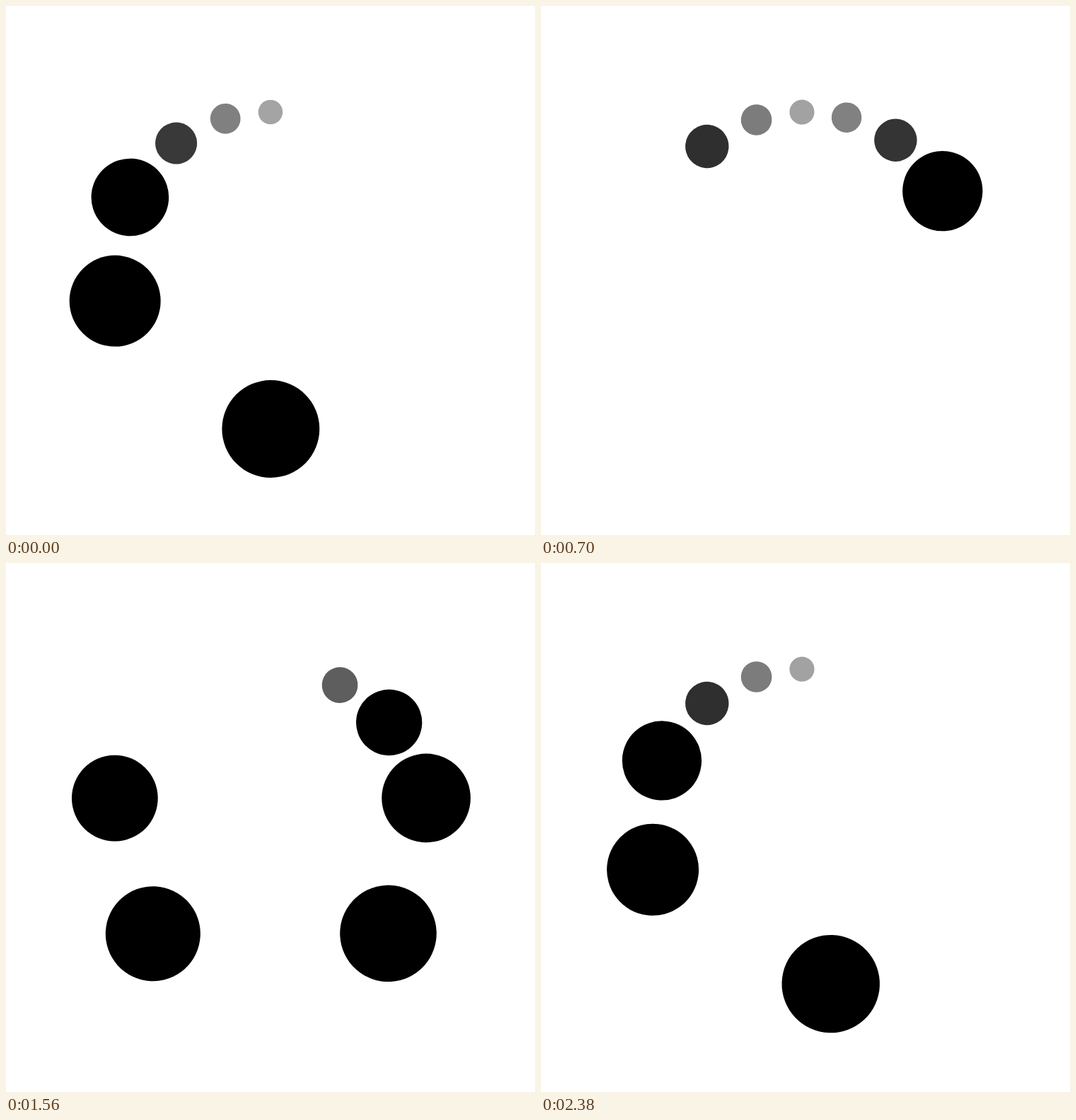
Animation, 748 px wide and 748 px high, one loop 2.4 s. Source, as an HTML page:

```html
<!DOCTYPE html>
<html lang="en">
<head>
<meta charset="utf-8">
<title>Orbit loader</title>
<style>
  @property --turn { syntax: "<angle>"; inherits: false; initial-value: 0deg; }
  @property --grow { syntax: "<number>"; inherits: false; initial-value: 0; }

  html, body { margin: 0; width: 100%; height: 100%; overflow: hidden; background: #fff; }
  svg { display: block; width: 100%; height: 100%; }

  circle {
    --shade: calc(164 - 455 * var(--grow));
    r: calc(17.3px + 52.2px * var(--grow));
    fill: rgb(var(--shade), var(--shade), var(--shade));
    transform: rotate(var(--turn)) translateY(-224px);
    animation:
      orbit 2400ms cubic-bezier(.78, .33, .22, .67) infinite,
      swell 2400ms cubic-bezier(.8, .25, .2, .75) infinite;
    animation-delay: calc(240ms * var(--i) - 2398.8ms);
  }

  @keyframes orbit {
    from { --turn: 0deg; }
    to { --turn: 360deg; }
  }

  /* the peak comes just before the lowest point */
  @keyframes swell {
    0%, 100% { --grow: 0; }
    48.333% { --grow: 1; }
  }
</style>
</head>
<body>
<svg viewBox="-374 -374 748 748">
  <circle style="--i: 0"/>
  <circle style="--i: 1"/>
  <circle style="--i: 2"/>
  <circle style="--i: 3"/>
  <circle style="--i: 4"/>
  <circle style="--i: 5"/>
</svg>
</body>
</html>
```
